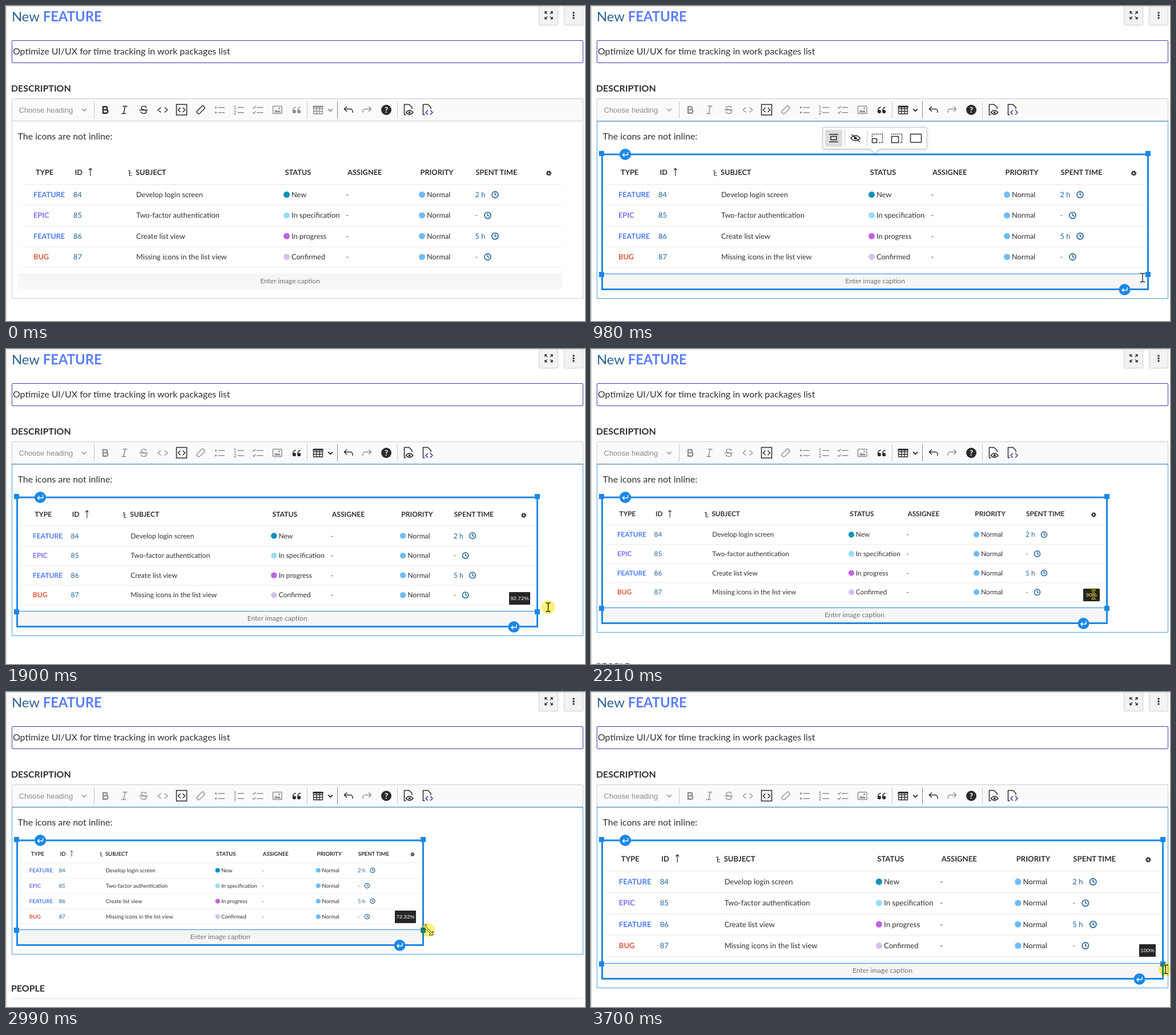
An HTML page for the animation above (3760 ms loop, 1014x552 px).

```html
<!DOCTYPE html>
<html lang="en">
<head>
<meta charset="utf-8">
<title>Resizing an image in the editor</title>
<style>
html, body { margin: 0; width: 100%; height: 100%; overflow: hidden; background: #fff; }
svg { display: block; width: 100vw; height: 100vh; font: 15.93px Lato, sans-serif; }
text { fill: #2f2f2f; white-space: pre; }
.b { font-weight: 700; }
.box { fill: #fff; stroke: #cbcbcb; }
.ico { fill: none; stroke: currentColor; stroke-width: 1.5; stroke-linecap: round; stroke-linejoin: round; color: #2b2b2b; }
.ico .f { fill: currentColor; stroke: none; }
.ico text { fill: currentColor; stroke: none; }
.grey { color: #909090; }
.quiet { color: #909090; }
.focus .quiet { color: #2b2b2b; }
.focus .live { color: #909090; }
.sep { stroke: #c6c6c6; }
#table { font-size: 12.75px; text-rendering: geometricPrecision; }
#editor { fill: #fff; stroke: #cbcbcb; }
.focus #editor { stroke: #4b9de0; }
#inset, #balloon, #marks, #tip, #spot { visibility: hidden; }
.focus #inset, .focus #marks, .drag #tip, .drag #spot { visibility: visible; }
.focus:not(.drag) #balloon { visibility: visible; }
#sel { --c: #ffc83d; visibility: hidden; }
.hover #sel { visibility: visible; }
.focus #sel { --c: #1c88e4; visibility: visible; }
#frame { fill: none; stroke: var(--c); stroke-width: 3; }
#knob circle { fill: var(--c); }
#knob path { fill: none; stroke: #fff; stroke-width: 1.4; stroke-linejoin: round; stroke-linecap: round; }
#marks rect { fill: #1c88e4; }
#marks path { stroke: #1c88e4; stroke-width: 1; }
#tip text { font: 9.5px "Liberation Sans", Arial, sans-serif; fill: #fff; text-anchor: middle; }
#spot { fill: #fdee4a; mix-blend-mode: multiply; opacity: .78; }
</style>
</head>
<body>
<svg id="stage" viewBox="0 0 1014 552">
  <defs>
    <g id="knob"><circle r="10"/><path d="M4.5-3.5v4.5h-9M-1.8-1.8l-2.8 2.8 2.8 2.8"/></g>
    <path id="bar" d="M-4-7.5h2.5l1.5 1 1.5-1h2.5M0-6.5v13M-4 7.5h2.5l1.5-1 1.5 1h2.5"/>
  </defs>

  <path d="M0 .5h1014M.5 0v552" stroke="#d2d2d2"/>
  <text x="10" y="26.5" style="font-size:23.85px;fill:#2d6291">New <tspan class="b" fill="#5a7dfb" style="fill:#5a7dfb">FEATURE</tspan></text>
  <g fill="#f3f3f3" stroke="#d0d0d0">
    <rect x="933.5" y=".5" width="33" height="33" rx="1.5"/>
    <rect x="977.5" y=".5" width="33" height="33" rx="1.5"/>
  </g>
  <g class="ico" style="stroke-linecap:butt;stroke-linejoin:miter">
    <path d="M944 13.5v-3.5h3.5M944 10l4 4M953.5 10h3.5v3.5M957 10l-4 4M944 19v3.5h3.5M944 22.5l4-4M957 19v3.5h-3.5M957 22.5l-4-4" stroke-width="1.4"/>
    <path class="f" d="M992.5 10.5h3v3h-3zM992.5 15h3v3h-3zM992.5 19.5h3v3h-3z"/>
  </g>
  <rect x="10.5" y="60.5" width="1000" height="39" rx="1.5" fill="#fff" stroke="#3c39ab"/>
  <text x="12" y="84.5">Optimize UI/UX for time tracking in work packages list</text>
  <text class="b" x="9" y="149.5">DESCRIPTION</text>

  <rect x="10.5" y="162.5" width="1000" height="39" rx="1.5" fill="#fafafa" stroke="#cbcbcb"/>
  <rect id="editor" x="10.5" y="201.5" width="1000"/>
  <path id="inset" d="M11 202.5h999" stroke="#c3c7cb"/>
  <text x="22.5" y="186.5" style="font:13px 'Liberation Sans',Arial,sans-serif;fill:#8c8c8c">Choose heading</text>
  <path class="sep" d="M154.5 167v30M527.5 167v30M685.5 167v30"/>
  <path d="M580.5 167v30" stroke="#888"/>

  <g class="ico">
    <path class="grey" d="M133.5 180.5l3.5 3.5 3.5-3.5"/>
    <g class="live">
      <path d="M170 176.500h4.5a2.7 2.7 0 0 1 0 5.4h-4.5zM170 181.9h5.5a2.9 2.9 0 0 1 0 5.8h-5.5z" stroke-width="2.4"/>
      <path d="M205 175.5h7M202.5 188.5h7M208.8 175.5l-3 13"/>
      <path d="M245.5 178.3c-.8-3.6-8.6-3.6-8.6.2 0 4.3 9 2.3 9 6.6 0 4.2-8.6 4.2-9.6.3M234 182.3h14"/>
      <path d="M271 178l-5 4 5 4M278 178l5 4-5 4"/>
      <path transform="translate(341 182) rotate(-45)" d="M2.5 3.2h-7.5a3.2 3.2 0 0 1 0-6.4h4M-2.5-3.2h7.5a3.2 3.2 0 0 1 0 6.4h-4" stroke-width="1.4"/>
    </g>
    <path d="M298.5 172.5h18v18.5h-18zM305 178.5l-3.5 3.5 3.5 3.5M310 178.5l3.5 3.5-3.5 3.5" stroke-linejoin="miter"/>
    <g class="grey">
      <path d="M372 177.7h10.5M372 186.7h10.5M406 177.7h10.5M406 186.7h10.5M439.5 177.7h10.5M439.5 186.7h10.5M432.5 177.7l1.5 1.5 3-3.3M432.5 186.7l1.5 1.5 3-3.3"/>
      <circle class="f" cx="367.5" cy="177.7" r="1.7"/><circle class="f" cx="367.5" cy="186.7" r="1.7"/>
      <text class="b" x="398.5" y="181" font-size="8.5">1</text><text class="b" x="398.5" y="190" font-size="8.5">2</text>
      <rect x="467.5" y="175.5" width="15.5" height="13" rx="1"/>
      <path class="f" d="M469.5 186.5l3.5-5 2.5 3 2.5-2 3.5 4z"/><circle class="f" cx="478.5" cy="179.3" r="1.5"/>
    </g>
    <g class="quiet">
      <path d="M502.5 184c0-3.5 1.8-5.8 4.5-6.8M510.7 184c0-3.5 1.8-5.8 4.5-6.8"/>
      <circle class="f" cx="504.9" cy="185" r="3.1"/><circle class="f" cx="513.1" cy="185" r="3.1"/>
      <path d="M538.5 175.5h16v13.5h-16zM538.5 180h16M538.5 184.5h16M543.8 176v13M549.2 176v13" stroke-width="1.3"/>
      <path d="M538.5 176.5h16" stroke-width="2.5"/>
      <path d="M564.8 181l3.3 3.3 3.3-3.3" stroke-width="1.8"/>
    </g>
    <path id="undo" d="M592.5 180.5h10.5a4 4 0 0 1 4 4v2M596.5 176.5l-4.2 4 4.2 4"/>
    <use href="#undo" class="grey" transform="matrix(-1 0 0 1 1232 0)"/>
    <circle class="f" cx="666" cy="182" r="9"/>
    <text class="b" x="666" y="187" text-anchor="middle" font-size="14" style="fill:#fff">?</text>
    <path d="M700 190.5h-2.5v-18h8.5l5 5v2.5"/>
    <path d="M700.5 186.5q6-7.5 12.5 0q-6.5 7-12.5 0z"/><circle class="f" cx="706.7" cy="186.4" r="2"/>
    <path d="M733 190.5h-2.5v-18h8.5l5 5v2.5"/>
    <path d="M738.5 183l-3.5 3.5 3.5 3.5M743.5 183l3.5 3.5-3.5 3.5" stroke="#35308f"/>
  </g>

  <text x="20.5" y="233.5">The icons are not inline:</text>
  <g id="table"></g>

  <g id="foot">
    <rect id="capbar" x="21" y="469" height="26.5" fill="#f6f6f6"/>
    <text id="caption" y="485.7" text-anchor="middle" style="font-size:12px;fill:#6f6f6f">Enter image caption</text>
    <text class="b" x="9" y="577.5">PEOPLE</text>
    <path d="M10 590.5h1000" stroke="#dedede"/>
    <text class="b" x="10" y="619.5" style="font-size:14px">Assignee</text>
    <rect class="box" x="460.5" y="605.5" width="550" height="40" rx="3"/>
  </g>

  <g id="sel">
    <rect id="frame" x="19.5" y="260"/>
    <g id="marks"><path id="rule"/></g>
    <use href="#knob" x="60" y="260"/>
    <use href="#knob" id="after"/>
  </g>

  <g id="balloon">
    <path d="M408 212.5h178a2 2 0 0 1 2 2v34a2 2 0 0 1-2 2h-81l-8 8-8-8h-81a2 2 0 0 1-2-2v-34a2 2 0 0 1 2-2z" fill="#fff" stroke="#c4c4c4" style="filter:drop-shadow(0 1px 2px #0003)"/>
    <rect x="410" y="217" width="30" height="29.5" rx="1.5" fill="#dcdcdc"/>
    <path class="sep" d="M444.5 217v29M483.5 217v29"/>
    <g class="ico" style="stroke-linecap:butt;stroke-linejoin:miter">
      <path d="M417 225h16M417 238h16M420 228.5h10v6h-10z"/>
      <path d="M455 231.5q8-9 16.5 0q-8.5 9-16.5 0zM456 225l15 13"/><circle class="f" cx="463" cy="231.5" r="2.5"/>
      <path d="M492.5 232.5h8v7h-8z"/><path d="M492.5 229v-4.5h18v15h-7" stroke-dasharray="2 1.5"/>
      <path d="M526.5 228.5h12v11h-12z"/><path d="M526.5 225.5v-1h18v15h-4" stroke-dasharray="2 1.5"/>
      <rect x="559.5" y="224.5" width="19" height="14.5" rx="1"/>
    </g>
  </g>

  <g id="tip"><rect y="-22" height="22" rx="1" fill="#262626"/><text y="-8"></text></g>
  <g id="cursor">
    <g id="beam" fill="none" stroke-linejoin="round">
      <use href="#bar" stroke="#fff" stroke-width="3"/>
      <use href="#bar" stroke="#111" stroke-width="1.3"/>
    </g>
    <path id="grip" d="M-9-9h7l-2.4 2.4 11 11 2.4-2.4v7h-7l2.4-2.4-11-11-2.4 2.4z" fill="#fff" stroke="#222" stroke-width=".9"/>
    <circle id="spot" r="12"/>
  </g>
</svg>
<script>
const $ = id => document.getElementById(id);
const set = (el, attrs) => { for (const k in attrs) el.setAttribute(k, attrs[k]); };

// Table picture, laid out at its starting size
const text = (x, y, s, fill = '#2f2f2f', cls = '') =>
  `<text x="${x}" y="${y}" class="${cls}" style="fill:${fill}">${s}</text>`;
const dot = (x, y, fill) => `<circle cx="${x}" cy="${y}" r="5.5" fill="${fill}"/>`;
const clock = (x, y) =>
  `<path d="M${x - 5.5} ${y}a5.5 5.5 0 1 1 11 0a5.5 5.5 0 1 1-11 0M${x} ${y - 3.5}v3.5l2.5 1.5" fill="none" stroke="#1f5f93" stroke-width="1.6"/>`;
const line = y => `<path d="M29 ${y}H974" stroke="#e8e8e8"/>`;

const heads = { TYPE: 52, ID: 120.5, SUBJECT: 227, STATUS: 488.5, ASSIGNEE: 598, PRIORITY: 725.5, 'SPENT TIME': 822.5 };
const rows = [
  ['FEATURE', '#4c7bf0', 'Develop login screen', 'New', '#1391ba', '2 h'],
  ['EPIC', '#7a6cf0', 'Two-factor authentication', 'In specification', '#9adcf9', '-'],
  ['FEATURE', '#4c7bf0', 'Create list view', 'In progress', '#c261e8', '5 h'],
  ['BUG', '#dd563b', 'Missing icons in the list view', 'Confirmed', '#d6c0ef', '-']
];
const link = '#1f6397';
let art = Object.entries(heads).map(([s, x]) => text(x, 296.2, s, '#2f2f2f', 'b')).join('');
art += `<path d="M147.8 298v-13.5M145 287.5l2.8-3.2 2.8 3.2M214 288.5h3.5M216.2 288.5v8.5h4.5M216.2 292.5h3.5" fill="none" stroke="#2f2f2f" stroke-width="1.2"/>
  <circle cx="950.5" cy="293" r="2.5" fill="none" stroke="#2f2f2f" stroke-width="2"/>
  <circle cx="950.5" cy="293" r="4" fill="none" stroke="#2f2f2f" stroke-width="1.6" stroke-dasharray="1.57 1.57"/>`;
art += line(312.8);
rows.forEach(([type, color, subject, status, tint, spent], i) => {
  const y = 330.6 + 36.35 * i, base = y + 4.5;
  art += text(48, base, type, color, 'b') + text(118, base, 84 + i, link) + text(228, base, subject)
    + dot(491.5, y, tint) + text(500, base, status) + text(595.5, base, '-')
    + dot(728.5, y, '#6fbcf9') + text(737, base, 'Normal')
    + text(821.5, base, spent, link) + clock(spent === '-' ? 843.5 : 856.5, y) + line(y + 18.5);
});
$('table').innerHTML = art;

const marks = [0, 1, 2, 3].map(() => {
  const r = document.createElementNS('http://www.w3.org/2000/svg', 'rect');
  set(r, { width: 9, height: 9 });
  return $('marks').appendChild(r);
});

// Runs of redraws: first time, last time, count
const LOOP = 3760, HOVER = 440, CLICK = 820, PRESS = 1670;
const runs = [[120, 600, 7], [750, 1210, 7], [1440, 1520, 2], [1670, 2130, 7], [2210, 2500, 5],
  [2580, 2700, 2], [2750, 3230, 7], [3310, 3380, 2], [3460, 3700, 4]];
const ticks = [0];
for (const [a, b, n] of runs)
  for (let i = 0; i < n; i++) ticks.push(Math.floor(a + (b - a) * i / (n - 1)));

// Time, image width in percent, pointer x and y
const START = 97.345;
const path = [
  [0, START, 925, 575], [120, START, 925, 566], [360, START, 940, 520], [600, START, 956, 484],
  [750, START, 958, 482], [980, START, 966, 476], [1210, START, 979, 474], [1440, START, 979, 474],
  [1520, START, 978, 474.5], [1670, START, 977, 473], [1750, 95, 945, 455], [1820, 91.2, 912, 438],
  [1900, 92.72, 949.5, 452.5], [1980, 96, 972, 464], [2130, 95, 940, 445], [2210, 90, 880, 430],
  [2500, 68.14, 664, 408], [2580, 65, 640, 393], [2700, 63.5, 638, 392], [2750, 64.5, 655, 396],
  [2990, 72.32, 739, 417], [3230, 82, 860, 445], [3310, 86.8, 905, 455], [3380, 91.82, 951, 461],
  [3460, 96, 985, 474], [3540, 99, 1002, 482], [3620, 100, 1005, 485], [3700, 100, 1006, 486]
];

function pose(t) {
  const i = path.findIndex(k => k[0] >= t);
  if (i <= 0) return path[0].slice(1);
  const a = path[i - 1], b = path[i], u = (t - a[0]) / (b[0] - a[0]);
  return [1, 2, 3].map(j => a[j] + (b[j] - a[j]) * u);
}

function draw(time) {
  const t = ticks.filter(k => k <= time).pop();
  const [size, x, y] = pose(t);
  // Edges sit on whole pixels
  const right = Math.floor(1001.5 - 9.78 * (100 - size)) + .5;
  const scale = (right - 20) / 955.5;
  const top = Math.round(260.1 + 209 * scale);

  $('stage').setAttribute('class',
    [t >= HOVER && 'hover', t >= CLICK && 'focus', t >= PRESS && 'drag'].filter(Boolean).join(' '));
  set($('table'), { transform: `translate(20 260) scale(${scale}) translate(-20 -260)` });
  set($('editor'), { height: top + 43.5 - 201.5 });
  set($('foot'), { transform: `translate(0 ${top - 469})` });
  set($('capbar'), { width: right - 22.5 });
  set($('caption'), { x: (19.5 + right) / 2 });

  set($('frame'), { width: right - 19.5, height: top + 27.5 - 260 });
  set($('rule'), { d: `M19 ${top + .5}H${right}` });
  set($('after'), { x: right - 41, y: top + 28 });
  marks.forEach((m, i) => set(m, { x: (i % 2 ? right : 18.5) - 4.5, y: (i > 1 ? top + 1.5 : 258.5) - 4.5 }));

  const label = +size.toFixed(2) + '%', tip = $('tip'), w = label.length > 4 ? 37 : 29;
  set(tip, { transform: `translate(${right - 12.5} ${top - 11})` });
  set(tip.firstChild, { x: -w, width: w });
  set(tip.lastChild, { x: -w / 2 });
  tip.lastChild.textContent = label;

  const onGrip = t >= CLICK && Math.hypot(x - right, y - top - 1) < 9;
  set($('cursor'), { transform: `translate(${x} ${y})` });
  $('beam').style.display = onGrip ? 'none' : '';
  $('grip').style.display = onGrip ? '' : 'none';
}

const t0 = performance.now();
function loop(now) {
  draw(Math.max(0, now - t0) % LOOP);
  requestAnimationFrame(loop);
}
draw(0);
requestAnimationFrame(loop);
</script>
</body>
</html>
```
